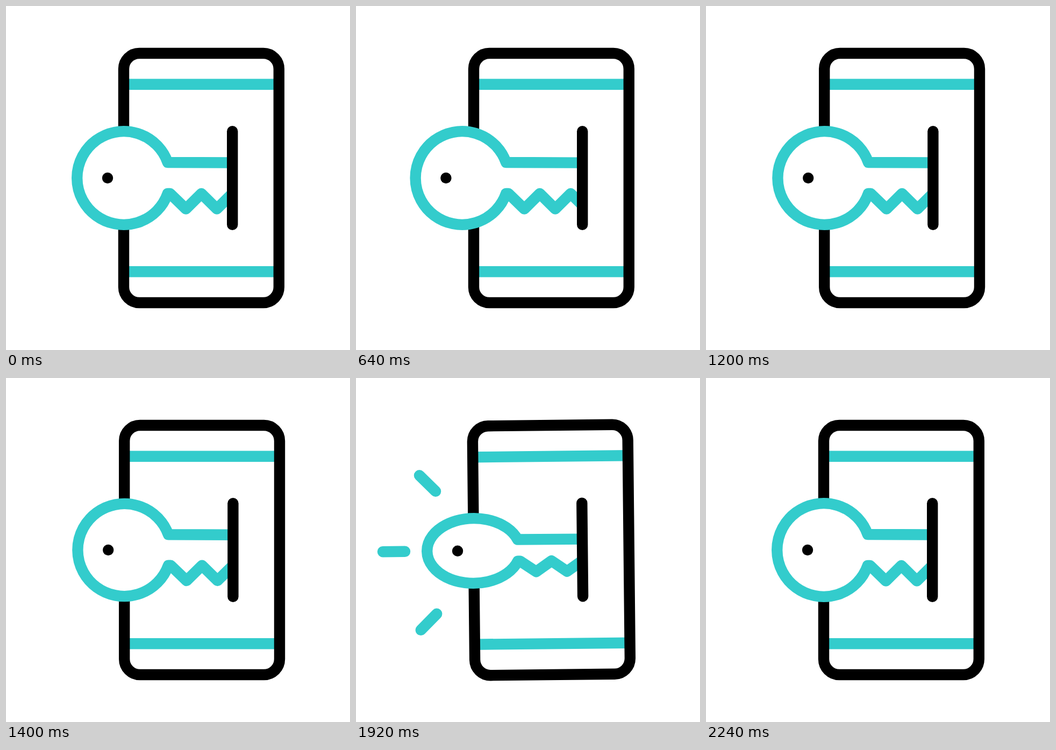
Recreate the animation shown at these times as an HTML page. Size 640 by 640 pixels, loop 2.52 s.

```html
<!DOCTYPE html>
<html lang="en">
<head>
<meta charset="utf-8">
<title>Key and phone</title>
<style>
  html, body { margin: 0; width: 100%; height: 100%; overflow: hidden; background: #fff; }
  svg { display: block; width: 100vw; height: 100vh; }
  path, rect { fill: none; stroke: #000; stroke-width: 20.4; stroke-linecap: round; stroke-linejoin: round; }
  .teal { stroke: #3cc; }
  .band { stroke-linecap: butt; }
  #key { fill: #fff; }
</style>
</head>
<body>
<svg viewBox="0 0 640 640">
  <clipPath id="slot"><path d="M-100 0H421V640H-100z"/></clipPath>
  <g id="scene">
    <path class="teal band" d="M219 145.8H508M219 494.2H508"/>
    <rect x="219" y="88" width="288.8" height="464" rx="29"/>
    <g clip-path="url(#slot)">
      <g id="slider">
        <path id="key" class="teal"/>
        <path d="M189 320h.01"/>
      </g>
    </g>
    <path d="M421.2 233.2V406.8"/>
    <path id="rays" class="teal"/>
  </g>
</svg>
<script>
const LOOP = 2520, STEP = 40;
const byId = id => document.getElementById(id);
const scene = byId('scene'), slider = byId('slider'), key = byId('key'), rays = byId('rays');

// Symmetric ease-in-out: cubic-bezier(k, 0, 1 - k, 1)
function ease(x, k) {
  let lo = 0, hi = 1;
  for (let i = 0; i < 24; i++) {
    const s = (lo + hi) / 2, r = 1 - s;
    const v = 3 * k * s * r * r + 3 * (1 - k) * s * s * r + s * s * s;
    if (v < x) lo = s; else hi = s;
  }
  return lo * lo * (3 - 2 * lo);
}

// Value at time t along [time, value] keys
function track(keys, t, k = 1 / 3) {
  if (t <= keys[0][0]) return keys[0][1];
  for (let i = 1; i < keys.length; i++) {
    const [t0, a] = keys[i - 1], [t1, b] = keys[i];
    if (t < t1) return a + (b - a) * ease((t - t0) / (t1 - t0), k);
  }
  return keys[keys.length - 1][1];
}

const slide = [[200, 0], [640, -21.6], [800, -21.6], [1160, 0]];
const push = [[1160, 0], [1300, 6], [1440, 0]];
const turn = [[1360, 1], [1800, 0.627], [2240, 1]];
const tilt = [[1400, 0], [1560, 3.2], [2120, -2.15], [2240, 0]];
const rayHead = [[1800, 0], [2000, 1]];
const rayTail = [[1920, 0], [2120, 1]];

// Inner end and full reach of each ray
const rayLines = [
  [149.2, 208.6, -46, -46],
  [91, 320, -63.5, 0],
  [149, 436.6, -46, 46]
];

// Turning flattens the outline but keeps the line weight
function keyPath(s) {
  const y = d => (320 + d * s).toFixed(2);
  const teeth = [[305.3, 29], [334.8, 57.6], [363.5, 29], [392.3, 57.6], [421, 29], [450, 57.6]];
  return `M460 ${y(-28.3)}L300.8 ${y(-29)}A86.8 ${86.8 * s} 0 1 0 300.8 ${y(29)}` +
    teeth.map(([x, d]) => `L${x} ${y(d)}`).join('');
}

function rayPath(a, b) {
  if (b - a < 0.001) return '';
  return rayLines.map(([x, y, dx, dy]) =>
    `M${x + dx * a} ${y + dy * a}L${x + dx * b} ${y + dy * b}`).join('');
}

function draw(t) {
  scene.setAttribute('transform', `translate(${track(push, t)} 0) rotate(${track(tilt, t)} 363.4 320)`);
  slider.setAttribute('transform', `translate(${track(slide, t, 0.4)} 0)`);
  key.setAttribute('d', keyPath(track(turn, t)));
  rays.setAttribute('d', rayPath(track(rayTail, t), track(rayHead, t)));
}

const start = performance.now();
function tick() {
  const t = (performance.now() - start) % LOOP;
  draw(Math.floor(t / STEP) * STEP);
  requestAnimationFrame(tick);
}
tick();
</script>
</body>
</html>
```
